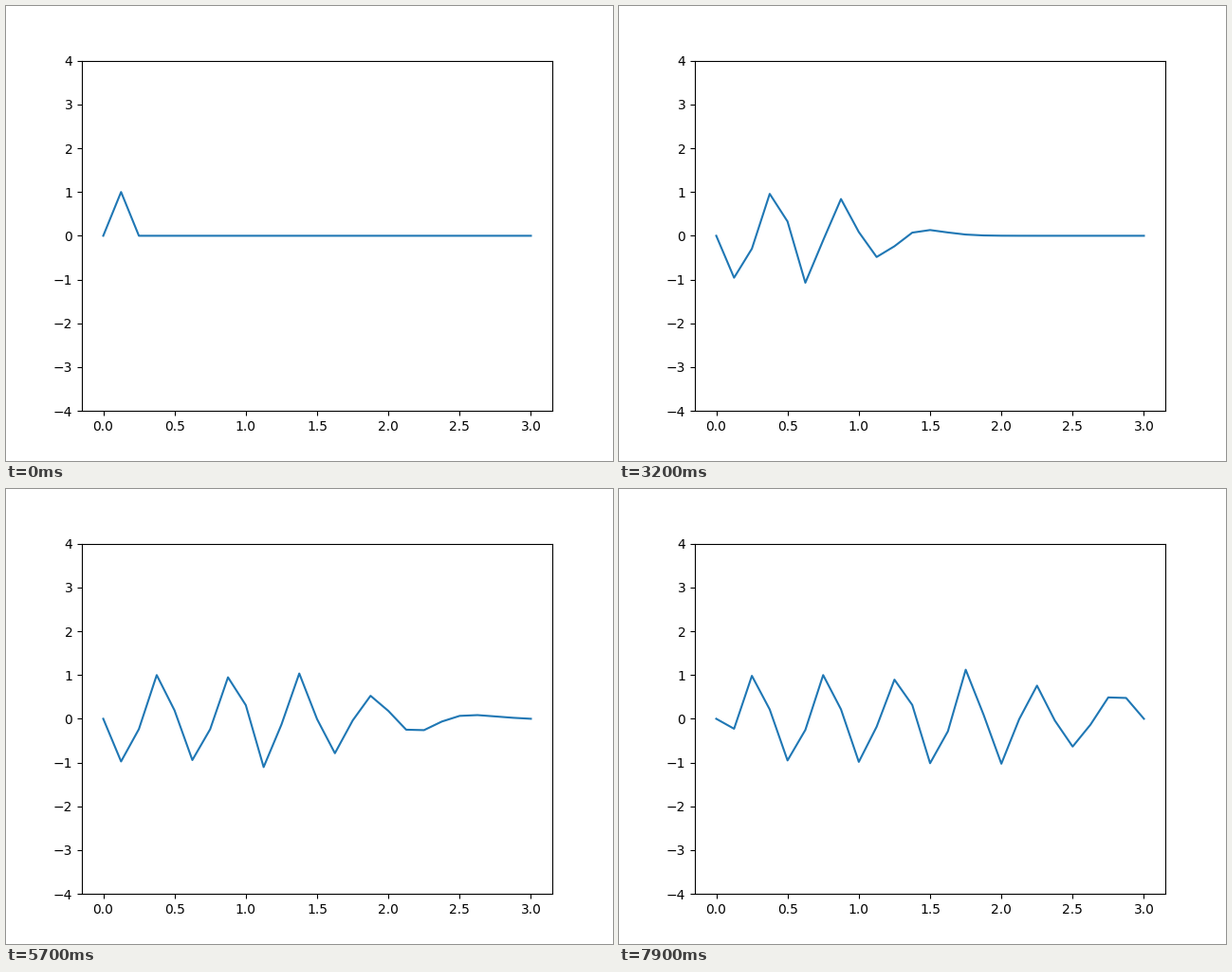
A matplotlib script for the animation above (8 s loop, 640 by 480 pixels).

```python
import numpy as np
import matplotlib.pyplot as plt
from matplotlib.animation import FuncAnimation

FRAMES, INTERVAL = 80, 100
LENGTH, CELLS = 3.0, 24
DRIVE = 0.5         # drive phase per frame (rad)
COUPLING = 0.125    # (c * frame_time / dx) ** 2
SUBSTEPS = 20


def acceleration(u):
    a = np.zeros_like(u)
    a[2:-1] = COUPLING * (u[1:-2] - 2 * u[2:-1] + u[3:])
    return a


def simulate():
    """Wave on a string with fixed ends, shaken at its first inner node."""
    dt = 1 / SUBSTEPS
    u = np.zeros(CELLS + 1)
    v = np.zeros_like(u)
    u[1] = 1
    a = acceleration(u)
    history = [u.copy()]
    for step in range(1, (FRAMES - 1) * SUBSTEPS + 1):
        v += 0.5 * dt * a
        u += dt * v
        u[1] = np.cos(DRIVE * step * dt)
        a = acceleration(u)
        v += 0.5 * dt * a
        if step % SUBSTEPS == 0:
            history.append(u.copy())
    return history


x = np.linspace(0, LENGTH, CELLS + 1)
waves = simulate()

fig, ax = plt.subplots(figsize=(6.4, 4.8), dpi=100)
line, = ax.plot(x, waves[0])
ax.set_ylim(-4, 4)


def update(frame):
    line.set_ydata(waves[frame])
    return line,


anim = FuncAnimation(fig, update, frames=FRAMES, interval=INTERVAL,
                     repeat=True, repeat_delay=0)
plt.show()
```
